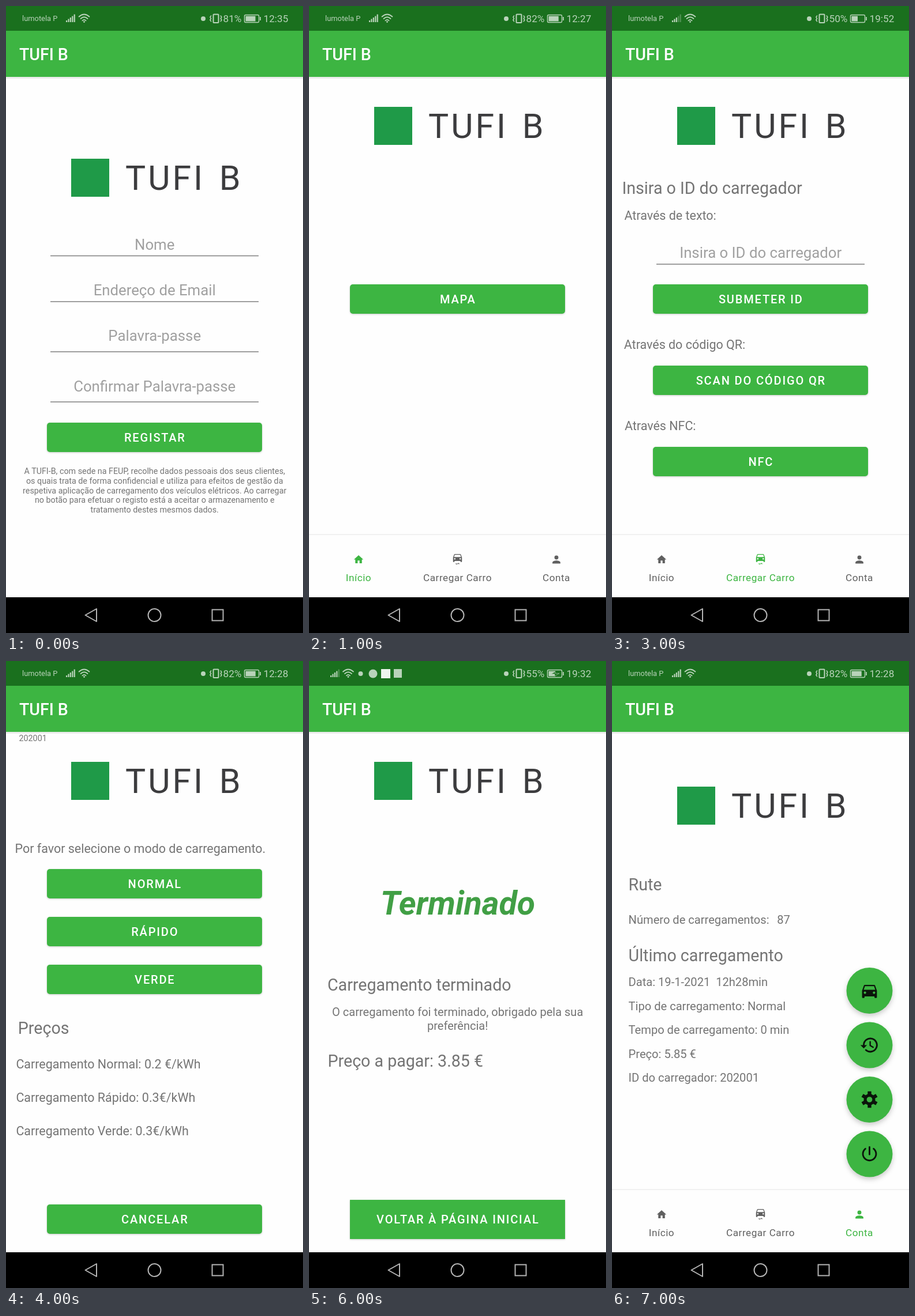
Write an HTML page that moves like this. It is 515 px wide and 1088 px high and loops after 8000 ms.

```html
<!DOCTYPE html>
<html lang="pt">
<head>
<meta charset="utf-8">
<title>App de carregamento</title>
<style>
html, body { margin: 0; width: 100%; height: 100%; overflow: hidden; background: #fff; }
svg { display: block; width: 515px; height: 1088px; font-family: Roboto, sans-serif; }
text { white-space: pre; }
.screen { visibility: hidden; animation: show 8s step-end infinite; animation-delay: calc((var(--i) - 8) * 1s); }
@keyframes show { 0% { visibility: visible; } 12.5%, 100% { visibility: hidden; } }
.body { fill: #747474; }
.hint { fill: #a0a0a0; }
.mid { text-anchor: middle; }
.end { text-anchor: end; }
.btn { fill: #fff; font-weight: 500; letter-spacing: 1.85px; text-anchor: middle; }
.tab { letter-spacing: .5px; text-anchor: middle; }
.line { fill: none; stroke-linecap: round; stroke-linejoin: round; }
.place { fill: #5b5e63; stroke: #f6f5f6; stroke-width: 2.5px; paint-order: stroke; stroke-linejoin: round; }
.soft { filter: drop-shadow(0 1.5px 1.5px #0003); }
.lift { filter: drop-shadow(0 4px 4px #0003); }
</style>
</head>
<body>
<svg id="stage" viewBox="0 0 515 1088"></svg>
<script>
const GREEN = '#3db542', APP = 'TUFI B';

const text = (x, y, size, s, cls = 'body', extra = '') =>
  `<text x="${x}" y="${y}" font-size="${size}" class="${cls}" ${extra}>${s}</text>`;
const rect = (x, y, w, h, fill, extra = '') =>
  `<rect x="${x}" y="${y}" width="${w}" height="${h}" fill="${fill}" ${extra}/>`;
const dot = (x, y, r, fill, extra = '') => `<circle cx="${x}" cy="${y}" r="${r}" fill="${fill}" ${extra}/>`;
const line = (d, stroke, width = 2, extra = '') =>
  `<path class="line" d="${d}" stroke="${stroke}" stroke-width="${width}" ${extra}/>`;
const at = (x, y, k, s) => `<g transform="translate(${x} ${y}) scale(${k}) translate(-12 -12)">${s}</g>`;

// Icons on a 24 unit grid
const ring = (x, y, r) => `M${x - r} ${y}a${r} ${r} 0 1 0 ${2 * r} 0a${r} ${r} 0 1 0 ${-2 * r} 0`;
const icons = {
  home: c => `<path fill="${c}" d="M10 20v-6h4v6h5v-8h3L12 3 2 12h3v8z"/>`,
  person: c => dot(12, 8, 4, c) + `<path fill="${c}" d="M4 20v-2c0-2.7 5.3-4 8-4s8 1.3 8 4v2z"/>`,
  car: c => `<path fill="${c}" fill-rule="evenodd" d="M6.5 5h11q1.1 0 1.4 1L21 12v8q0 1-1 1h-1q-1 0-1-1v-1H6v1q0 1-1 1H4q-1 0-1-1v-8L5.1 6q.3-1 1.4-1zM6.5 6.5L5 11h14l-1.5-4.5z${ring(6.5, 14.5, 1.5)}${ring(17.5, 14.5, 1.5)}"/>`,
  charge: c => `<g transform="translate(0 -4)">${icons.car(c)}</g><path fill="${c}" d="M7 20h6v-1.500l4 2.500h-6v1.500z"/>`,
  history: c => line('M5 12a8 8 0 1 1 2.6 5.9', c, 2) + `<path fill="${c}" d="M1 12h8l-4 4z"/>` +
    line('M12.8 8v4.5l3.6 2.1', c, 1.7),
  gear: c => dot(12, 12, 5.2, 'none', `stroke="${c}" stroke-width="3.6"`) +
    [0, 60, 120].map(a => `<path d="M12 2v4.5M12 17.5V22" stroke="${c}" stroke-width="4.4" transform="rotate(${a} 12 12)"/>`).join(''),
  power: c => line('M12 3.5v9M7 5.6a8 8 0 1 0 10 0', c, 2)
};

// Status bar
const INK = '#b9d3ba';
const signal = (x, lit) => [3, 5.5, 8, 10.5, 13.5].map((h, i) =>
  rect(x + i * 3.4, 28 - h, 2.2, h, INK, i < lit ? '' : 'opacity=".35"')).join('');
const wifi = x => line(`M${x - 9} 18.5q9-8 18 0M${x - 6} 22q6-5.4 12 0M${x - 3} 25.3q3-2.8 6 0`, INK, 1.8) + dot(x, 27.5, 1.4, INK);
const vibrate = rect(359.5, 14.5, 9, 14.5, 'none', `stroke="${INK}" stroke-width="2" rx="1"`) +
  line('M355.5 17l-1.6 2.4 1.6 2.4-1.6 2.4 1.6 2.4M372.3 17l1.6 2.4-1.6 2.4 1.6 2.4-1.6 2.4', INK, 1.6);
const locator = line('M342 29q-5.5-6-5.5-9.5a5.5 5.5 0 0 1 11 0q0 3.5-5.5 9.5z', INK, 1.6) + dot(342, 19.5, 1.8, INK);
const battery = (level, plugged) =>
  rect(413.5, 15.5, 25, 13, 'none', `stroke="${INK}" stroke-width="1.4" rx="2"`) +
  rect(415.5, 17.5, 21 * level / 100, 9, INK) + rect(440, 19, 1.8, 6, INK) +
  (plugged ? '<path fill="#1a701e" stroke="#b9d3ba" stroke-width=".6" d="M420 22.5l7-4v3h7l-8 4.5v-3.5z"/>' : '');

function status({ level, time, lit = 5, map, plugged }) {
  const left = plugged
    ? signal(37, 4) + wifi(68) + dot(89.5, 22, 4, INK) + dot(111, 22, 7.5, INK) + rect(125, 14, 16, 16, '#eef5ee') + rect(147, 14, 14, 15, INK)
    : text(28, 26, 12.9, 'lumotela P', '', `fill="${INK}"`) + signal(104, lit) + wifi(135.5);
  return rect(0, 0, 515, 43, '#1a701e') + left + (map ? dot(155, 22, 4, INK) + locator : dot(342, 22, 4, INK)) + vibrate +
    text(376.5, 28, 17.2, level + '%', '', `fill="${INK}"`) + battery(level, plugged) +
    text(446.5, 28, 17.2, time, '', `fill="${INK}"`);
}

const header = title => rect(0, 123, 515, 3, '#000', 'opacity=".07"') + rect(0, 43, 515, 80, GREEN) +
  text(22.9, 94, 28.6, title, '', 'fill="#fff" font-weight="500"');
const footer = rect(0, 1026, 515, 62, '#000') +
  line('M137.5 1057l19.5-11v22z', '#b4b4b4') + dot(257.5, 1057, 11, 'none', 'stroke="#b4b4b4" stroke-width="2"') +
  rect(357.5, 1047.5, 19, 19, 'none', 'stroke="#b4b4b4" stroke-width="2"');

// Shared widgets
const logo = cy => rect(113, cy - 33, 66, 66, '#1f9a48') +
  text(207, cy + 21, 59, APP, '', 'fill="#3c3c3e" letter-spacing="4" word-spacing="6"');
const button = (y, s, h = 51, r = 5) => rect(71, y, 373, h, GREEN, `rx="${r}" class="soft"`) +
  text(258.3, y + h / 2 + 7.3, 20, s, 'btn');
const field = (base, rule, s) => text(257.7, base, 25.75, s, 'hint mid') + rect(77, rule - .7, 361, 1.4, '#777');
const tabs = active => rect(0, 916.5, 515, 1.5, '#ededed') +
  [['home', 'Início', 86, .82], ['charge', 'Carregar Carro', 257.5, .86], ['person', 'Conta', 429, .86]].map(([icon, s, x, k], i) => {
    const c = i === active ? GREEN : '#606060';
    return at(x, 960.5, k, icons[icon](c)) + text(x, 998, 17.17, s, 'tab', `fill="${c}"`);
  }).join('');
const fab = (y, icon) => dot(446.5, y, 40, GREEN, 'class="lift"') + at(446.5, y, 1.43, icons[icon]('#0b140b'));
const lines = (x, y, step, size, list, cls) => list.map((s, i) => text(x, y + i * step, size, s, cls)).join('');
const done = s => text(258, 439.5, 57.2, s, 'mid', 'fill="#419f45" font-weight="700" font-style="italic"');

// Map
let seed = 11;
const rnd = () => (seed = seed * 16807 % 2147483647) / 2147483647;

// Smooth curve through every point
function curve(points) {
  const p = points.split(' ').map(s => s.split(',').map(Number));
  const get = i => p[Math.max(0, Math.min(p.length - 1, i))];
  const bend = (a, b, c, k) => a.map((v, j) => (v + (c[j] - b[j]) * k).toFixed(1));
  let d = `M${p[0]}`;
  for (let i = 0; i < p.length - 1; i++) {
    const a = get(i), b = get(i + 1);
    d += `C${bend(a, get(i - 1), b, 1 / 6)} ${bend(b, a, get(i + 2), -1 / 6)} ${b}`;
  }
  return d;
}
function street() {
  let x = rnd() * 515, y = 130 + rnd() * 900, a = rnd() * 6.28, p = `${x},${y}`;
  for (let n = 4 + rnd() * 5; n > 0; n--) {
    a += (rnd() - .5) * 1.3;
    x += Math.cos(a) * 24;
    y += Math.sin(a) * 24;
    p += ` ${x.toFixed(1)},${y.toFixed(1)}`;
  }
  return curve(p);
}
const streets = n => Array.from({ length: n }, street).join('');
function blob([x, y, rx, ry]) {
  const p = Array.from({ length: 11 }, (_, i) => {
    const a = i * Math.PI / 5.5, k = .7 + rnd() * .45;
    return [x + Math.cos(a) * rx * k, y + Math.sin(a) * ry * k].map(v => v.toFixed(1));
  });
  return `<path fill="#cdebd0" d="M${p.join('L')}z"/>`;
}

const motorways = [
  '258,123 215,151 205,190 180,250 172,330 150,352 127,385 122,440 127,500 120,573',
  '400,123 408,180 396,235 372,290 372,340 386,383 365,440 350,485 342,545 315,602 285,640 263,700 260,768',
  '0,292 35,335 44,385 85,386 130,380 205,393 300,402 345,395 385,380 430,391 515,408',
  '0,600 60,580 118,572 180,597 240,612 300,612 380,602 440,590 515,587',
  '0,800 50,780 100,765 150,755 205,760 260,768 300,798 317,830 322,885 336,960',
  '0,728 30,770 48,815 72,890 80,950 90,1026'
].map(curve);
const mainRoads = [
  '0,702 60,722 110,726 145,707 220,698 280,718 340,719 378,736 372,762',
  '118,573 138,640 150,700 144,756',
  '0,462 40,408 80,352 60,345 36,350',
  '215,398 250,407 290,442 345,437 385,478 412,498 440,485 470,430 515,425',
  '386,383 416,440 430,490 418,540 372,590 345,612',
  '515,684 465,702 428,745 385,768 362,798 388,830 420,825 455,848 515,878',
  '412,498 440,506 460,560 515,505'
].map(curve);
const parks = [[42, 172, 22, 32], [48, 128, 30, 8], [290, 250, 34, 22], [312, 205, 18, 30], [342, 322, 28, 17], [488, 290, 21, 14],
  [490, 200, 14, 9], [375, 900, 40, 24], [440, 880, 26, 16], [12, 845, 12, 16], [213, 790, 12, 22], [375, 345, 18, 20], [330, 775, 8, 12]];

const shields = [['N318', 269, 138], ['N14', 128, 413], ['N107', 267, 428], ['N13', 125, 610], ['N105', 344, 612],
  ['N10', 504, 329], ['N15', 491, 733], ['N209', 398, 939], ['N', 227, 706],
  ['A41', 212, 391], ['A4', 442, 606], ['A28', 31, 759], ['A20', 315, 829], ['A1', 41, 843], ['A43', 463, 928]]
  .map(([s, x, y]) => {
    const blue = s[0] === 'A', w = s.length * 8 + (blue ? 6 : 5);
    return rect(x - w / 2, y - 11, w, 22, blue ? '#3d78c0' : '#fff', 'rx="2"') +
      text(x, y + 5, 13.8, s, 'mid', `fill="${blue ? '#fff' : '#333'}" font-weight="500"`);
  }).join('');

const places = [['São Pedro', 165, 177], ['de Avioso', 165, 199], ['Coronado', 367, 157], ['Santa Maria', 212, 229], ['de Avioso', 212, 251],
  ['Gemunde', 93, 250], ['Silva Escura', 318, 292], ['Barca', 185, 358], ['São Pedro Fins', 443, 366], ['Nogueira', 291, 392],
  ['Maia', 151, 459], ['Milheirós', 286, 525], ['Leça do Balio', 97, 545], ['Águas Santas', 343, 562], ['Ermesinde', 469, 563],
  ['São Mamede', 181, 649], ['de Infesta', 183, 671], ['Pedrouços', 291, 675], ['Baguim', 483, 648], ['do Monte', 482, 669],
  ['Rio Tinto', 382, 718], ['Campanhã', 357, 860], ['Oliveira', 283, 968], ['do Douro', 283, 990], ['Valbom', 397, 1002], ['Folgosa', 511, 222]]
  .map(([s, x, y]) => text(x, y + 6.5, 18.6, s, 'place mid')).join('') +
  [['teiró', 36, 153], ['Moreira', 43, 387], ['Custóias', 73, 595], ['Sra. da Hora', 72, 704]]
  .map(([s, x, y]) => text(x, y + 6.5, 18.6, s, 'place end')).join('') +
  text(117, 857, 28.4, 'Porto', 'place mid') + text(189, 1028, 21, 'Vila Nova', 'place mid') +
  text(101.5, 891, 19.2, 'Livraria Tamor', 'place mid', 'style="fill:#3b78d8"') +
  text(0, 522, 10, 'VRI', 'place', 'transform="rotate(60 2 517)"');

const river = '<path fill="#9fd3f6" d="M0 900q45-5 75 7 40-14 70 8 30 28 70 25 35-15 75-10 40-18 64 2 12 30 8 64 10 22 30 30h-25q-22-18-18-46 4-35-15-38-30 5-56 9-42 1-72 12-50-2-80-33-35-12-60 5-30 20-66 17z"/>';
const panel = (x, y, w, h) => rect(x, y, w, h, '#fff', 'rx="1" opacity=".86" class="soft"');

const controls = () =>
  panel(444, 141, 54, 54) + dot(471, 168, 10, 'none', 'stroke="#555" stroke-width="2.2"') + dot(471, 168, 5, '#555') +
  line('M471 154.5v3M471 178.5v3M457.5 168h3M481.5 168h3', '#555', 2.2) +
  panel(444, 892, 54, 53) + panel(444, 947, 54, 53) + '<path d="M459 918.5h24M471 906.5v24M459 973h24" stroke="#555" stroke-width="4"/>' +
  panel(314, 947, 54, 53) + panel(369, 947, 54, 53) +
  '<path fill="#4285f4" stroke="#4285f4" stroke-width="2" stroke-linejoin="round" d="M341 960l13 13-13 13-13-13z"/>' +
  line('M336.5 977v-5h8M342.5 968.5l3.5 3.5-3.5 3.5', '#fff', 2) +
  rect(383, 959, 28, 28, '#34a853') + dot(48, 1002, 12, '#4285f4');

const markers = () =>
  '<path fill="#4285f4" d="M178 903q-3-8-9-13a14 14 0 1 1 18 0q-6 5-9 13z"/>' + rect(171.5, 875, 13, 10, '#fff', 'rx="1"') +
  line('M174.5 875a3.5 3.5 0 0 1 7 0', '#fff', 1.6) +
  '<path fill="#4285f4" d="M239 325l13 1-8 6z"/>' + dot(248, 315, 8, '#4285f4', 'stroke="#fff" stroke-width="2"') +
  '<path fill="#fff" class="soft" d="M134 624h227v34H255l-8 13-8-13H134z"/>' +
  text(247, 648, 20, 'FEUP: 10 lugares livres', 'mid', 'fill="#111" font-weight="700"') +
  '<path fill="#ea4335" stroke="#c5372c" stroke-width=".8" d="M247 733q-2-16-10-24a18 18 0 1 1 20 0q-8 8-10 24z"/>' + dot(247, 691, 6.3, '#8d1a12');

function map() {
  const roads = motorways.concat(mainRoads).join('');
  return rect(0, 123, 515, 903, '#edeced') +
    '<path fill="#efecef" d="M0 400L150 390 250 440 340 620 380 740 340 900 240 940 0 900z"/>' +
    parks.map(blob).join('') + line(streets(45), '#dfdfe2', 1.1) + line(streets(150), '#fff', 1.5) + river +
    line(roads, '#f2d585', 5) + line(roads, '#fde293', 3.4) + places + shields + markers() + controls();
}

const screens = [
  { bar: { level: 81, time: '12:35' }, body: () => logo(298) +
    field(423, 433.5, 'Nome') + field(502, 513, 'Endereço de Email') + field(581, 600, 'Palavra-passe') + field(669, 687, 'Confirmar Palavra-passe') +
    button(723, 'REGISTAR') + lines(257.7, 812, 16.76, 14.3, [
      'A TUFI-B, com sede na FEUP, recolhe dados pessoais dos seus clientes,',
      'os quais trata de forma confidencial e utiliza para efeitos de gestão da',
      'respetiva aplicação de carregamento dos veículos elétricos. Ao carregar',
      'no botão para efetuar o registo está a aceitar o armazenamento e',
      'tratamento destes mesmos dados.'], 'body mid') },
  { bar: { level: 82, time: '12:27' }, body: () => logo(208) + button(483, 'MAPA') + tabs(0) },
  { bar: { level: 82, time: '12:27', lit: 3, map: true }, title: 'Mapa', body: map },
  { bar: { level: 50, time: '19:52', lit: 3 }, body: () => logo(208) +
    text(17.5, 326, 28.6, 'Insira o ID do carregador') + text(21.5, 371, 21.46, 'Através de texto:') +
    field(437, 448, 'Insira o ID do carregador') + button(483, 'SUBMETER ID') +
    text(20.8, 595, 21.46, 'Através do código QR:') + button(624, 'SCAN DO CÓDIGO QR') +
    text(22, 736, 21.46, 'Através NFC:') + button(765, 'NFC') + tabs(1) },
  { bar: { level: 82, time: '12:28' }, body: () => text(22.5, 138.5, 14.3, '202001') + logo(208) +
    text(15.5, 332.5, 21.46, 'Por favor selecione o modo de carregamento.') +
    button(361, 'NORMAL') + button(444, 'RÁPIDO') + button(527, 'VERDE') + text(20.8, 647, 28.6, 'Preços') +
    lines(17.4, 706.5, 58, 21.46, ['Carregamento Normal: 0.2 €/kWh', 'Carregamento Rápido: 0.3€/kWh', 'Carregamento Verde: 0.3€/kWh']) +
    button(943, 'CANCELAR') },
  { bar: { level: 82, time: '12:28' }, body: () => logo(208) + done('A carregar') + button(943, 'CANCELAR') },
  { bar: { level: 55, time: '19:32', plugged: true }, body: () => logo(208) + done('Terminado') +
    text(32, 572, 28.6, 'Carregamento terminado') +
    lines(257.7, 616, 23.5, 20.03, ['O carregamento foi terminado, obrigado pela sua', 'preferência!'], 'body mid') +
    text(32.5, 704, 28.6, 'Preço a pagar: 3.85 €') + button(935, 'VOLTAR À PÁGINA INICIAL', 68, 0) },
  { bar: { level: 82, time: '12:28' }, body: () => logo(251) + text(28.6, 397.5, 28.6, 'Rute') +
    text(28.6, 455.5, 20.1, 'Número de carregamentos:') + text(286.2, 455.5, 20.1, '87') +
    text(28.6, 521, 28.6, 'Último carregamento') +
    lines(28.6, 564, 41.5, 20.1, ['Data: 19-1-2021  12h28min', 'Tipo de carregamento: Normal', 'Tempo de carregamento: 0 min', 'Preço: 5.85 €', 'ID do carregador: 202001']) +
    ['car', 'history', 'gear', 'power'].map((icon, i) => fab(572 + i * 94.5, icon)).join('') + tabs(2) }
];

document.getElementById('stage').innerHTML = screens.map(({ bar, title = APP, body }, i) =>
  `<g class="screen" style="--i:${i}">${rect(0, 0, 515, 1088, '#fefefe')}${body()}${status(bar)}${header(title)}${footer}</g>`).join('');
</script>
</body>
</html>
```
